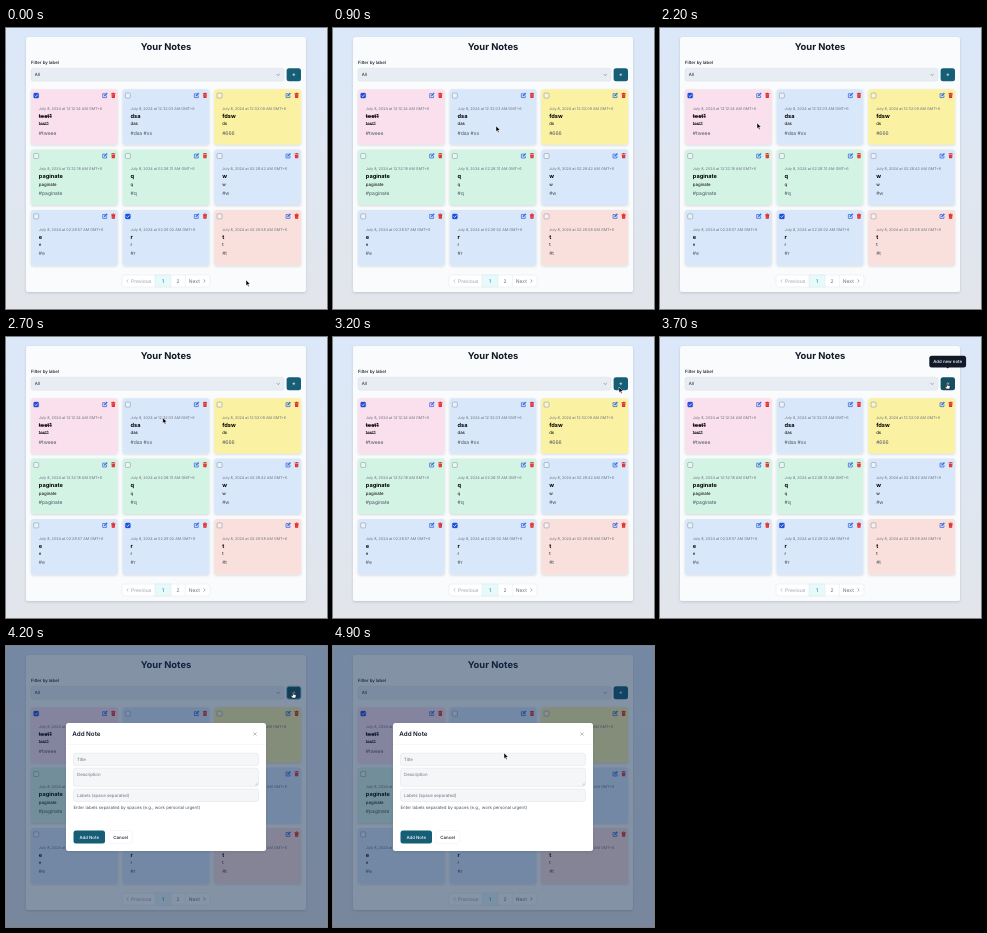
Recreate the animation shown at these times as an HTML page. Size 321 px wide and 281 px high, loop 5000 ms.

```html
<!DOCTYPE html>
<html lang="en">
<head>
<meta charset="utf-8">
<title>Your Notes</title>
<style>
html, body { margin: 0; width: 100%; height: 100%; overflow: hidden; }
svg { display: block; width: 100vw; height: 100vh; }
text { font-family: Inter, "Liberation Sans", sans-serif; text-rendering: geometricPrecision; white-space: pre; }
</style>
</head>
<body>
<svg id="stage" viewBox="0 0 321 281" preserveAspectRatio="none">
  <defs>
    <linearGradient id="sky" x2="0" y2="1">
      <stop offset="0" stop-color="#dbe8f9"/>
      <stop offset="1" stop-color="#e2e5ea"/>
    </linearGradient>
    <filter id="soft" x="-10%" y="-10%" width="120%" height="125%">
      <feDropShadow dx="0" dy="1" stdDeviation="1.2" flood-color="#334155" flood-opacity=".2"/>
    </filter>
    <g id="edit" fill="none" stroke="#3467df" stroke-width=".75" stroke-linejoin="round">
      <path d="M.2-1.6H-2.2V2.3H1.7V.2"/>
      <path d="M-.8.9-.6-.3 1.7-2.5 2.5-1.7.3.6Z" fill="#3467df" stroke-width=".3"/>
    </g>
    <g id="trash" fill="#e02424">
      <path d="M-2.1-2.1H-.9L-.6-2.6H.6L.9-2.1H2.1V-1.4H-2.1Z"/>
      <path d="M-1.8-1H1.8L1.5 2.6H-1.5Z"/>
      <path d="M-.6-.4V2M.6-.4V2" stroke="#f5a3a3" stroke-width=".3"/>
    </g>
  </defs>
  <g id="page"></g>
  <g id="tip"></g>
  <g id="modal"></g>
  <g id="pointer">
    <path id="arrow" d="M0 0V5.6L1.3 4.4 2.2 6.4 3.1 6 2.3 4.1H4.1Z" fill="#000" stroke="#fff" stroke-width=".45"/>
    <path id="hand" d="M-.5.4Q0-.4.5.4V2.3L2.6 2.8Q3.2 3 3.1 3.7L2.6 6H-.6L-2.2 3.8Q-1.8 3-.9 3.8L-.5 4Z" fill="#fff" stroke="#000" stroke-width=".5"/>
  </g>
</svg>
<script>
const $ = id => document.getElementById(id);
const INK = "#111827", GREY = "#6b7280", TEAL = "#155e75";

const rect = (x, y, w, h, fill, r = 2.5, extra = "") =>
  `<rect x="${x}" y="${y}" width="${w}" height="${h}" rx="${r}" fill="${fill}" ${extra}/>`;
const label = (x, y, str, size, fill = INK, weight = 400, extra = "") =>
  `<text x="${x}" y="${y}" font-size="${size}" fill="${fill}" font-weight="${weight}" ${extra}>${str}</text>`;
const line = (d, color, width = .6, extra = "") =>
  `<path d="${d}" fill="none" stroke="${color}" stroke-width="${width}" ${extra}/>`;
const use = (id, x, y) => `<use href="#${id}" x="${x}" y="${y}"/>`;
const edge = color => `stroke="${color}" stroke-width=".35"`;
const MID = 'text-anchor="middle"';

const BLUE = "#d8e8fa", GREEN = "#d3f3e5";
// title, text, tags, time, colour, done
const notes = [
  ["test1", "test1", "#tweee", "12:12:24", "#fadfed", true],
  ["dsa", "das", "#dsa #xx", "12:32:03", BLUE],
  ["fdsw", "ds", "#666", "12:32:09", "#faf1a3"],
  ["paginate", "paginate", "#paginate", "12:32:18", GREEN],
  ["q", "q", "#q", "02:28:31", GREEN],
  ["w", "w", "#w", "02:28:42", BLUE],
  ["e", "e", "#e", "02:28:57", BLUE],
  ["r", "r", "#r", "02:29:02", BLUE, true],
  ["t", "t", "#t", "02:29:08", "#fae0dd"]
];

function note([title, body, tags, time, color, done], i) {
  const x = 25 + (i % 3) * 91.67, y = 61.2 + Math.floor(i / 3) * 60.4;
  const tx = x + 7.8;
  const strike = i === 0 ? 'text-decoration="line-through"' : "";
  return rect(x, y, 86.67, 55.4, color, 2.5, 'filter="url(#soft)"')
    + rect(x + 2.7, y + 3.9, 5, 5, done ? "#1d4fd8" : "#f6f9fd", 1, `stroke="${done ? "#1d4fd8" : GREY}" stroke-width=".4" fill-opacity="${done ? 1 : .6}"`)
    + (done ? line(`M${x + 3.9} ${y + 6.5}l1 1 1.8-2.1`, "#fff", .75) : "")
    + use("edit", x + 73.9, y + 6.1) + use("trash", x + 82.3, y + 6.1)
    + label(tx, y + 20.7, `July 8, 2024 at ${time} AM GMT+6`, 3.75, GREY)
    + label(tx, y + 28.8, title, 5.625, "#000", 700, strike)
    + label(tx, y + 36, body, 4.375, "#000", i ? 400 : 500, strike)
    + label(tx, y + 45.3, tags, 5, "#4b5563");
}

function pager() {
  const border = edge("#d9dde3");
  return rect(116, 247, 88, 12, "#fff", 2.5, border)
    + rect(149, 247, 16, 12, "#e6fafc", 0, border)
    + line("M179.3 247V259", "#d9dde3", .35)
    + line("M122.3 251.4l-1.6 1.6 1.6 1.6", "#9ca3af")
    + label(125, 254.8, "Previous", 5, "#9ca3af")
    + label(157, 254.8, "1", 5, "#0e7490", 400, MID)
    + label(172, 254.8, "2", 5, GREY, 400, MID)
    + label(182.8, 254.8, "Next", 5, GREY)
    + line("M197.6 251.4l1.6 1.6-1.6 1.6", GREY);
}

$("page").innerHTML = rect(0, 0, 321, 281, "url(#sky)", 0)
  + rect(20, 9, 280, 255, "#fafbfc", 2.5, 'filter="url(#soft)"')
  + label(160, 21.9, "Your Notes", 9.375, INK, 700, MID)
  + label(25, 36.4, "Filter by label", 4.375, INK, 500)
  + rect(25, 40.2, 253, 13, "#e8edf3", 2.5, edge("#d1d5db"))
  + label(28.8, 48.4, "All", 4.375)
  + line("M270.6 46l1.6 1.6 1.6-1.6", GREY)
  + rect(280.6, 40.2, 14.4, 13, TEAL, 2.5, 'id="add"')
  + line("M286.4 46.7H289.2M287.8 45.3V48.1", "#fff", .6)
  + notes.map(note).join("") + pager();

$("tip").innerHTML = rect(269.3, 18.8, 36.8, 11.6, INK)
  + `<path d="M286.2 30h3l-1.5 1.6z" fill="${INK}"/>`
  + label(287.7, 26.2, "Add new note", 4.375, "#fff", 500, MID);

const field = (y, h, hint) => rect(67.5, y, 185, h, "#f5f6f8", 2.5, edge("#d1d5db"))
  + label(71, y + 8, hint, 4.375, GREY);

$("modal").innerHTML = rect(0, 0, 321, 281, "#102a50", 0, 'fill-opacity=".5"')
  + rect(60, 77, 200, 128, "#fff", 2.5, 'filter="url(#soft)"')
  + label(66.3, 90.1, "Add Note", 6.25, INK, 600)
  + line("M247.4 86.4l3.2 3.2M250.6 86.4l-3.2 3.2", "#8b93a0")
  + line("M60 98.4H260", "#e5e7eb", .35)
  + field(107.2, 12.4, "Title") + field(122.2, 18.2, "Description")
  + line("M249.2 139.4l2.4-2.4M250.6 139.4l1-1", GREY, .3)
  + field(142.9, 12.6, "Labels (space separated)")
  + label(67.5, 162.7, "Enter labels separated by spaces (e.g., work personal urgent)", 4.375, "#4b5563")
  + rect(67.5, 184.5, 31.5, 13, TEAL)
  + label(83.2, 192.6, "Add Note", 4.375, "#fff", 500, MID)
  + rect(102.8, 184.5, 23.6, 13, "#fff", 2.5, edge("#e5e7eb"))
  + label(114.6, 192.6, "Cancel", 4.375, INK, 500, MID);

// time, x, y
const path = [
  [0, 240, 252], [300, 240, 252], [900, 163, 98], [1300, 163, 98],
  [2000, 97, 95], [2400, 97, 95], [3200, 286, 50], [3400, 287, 46],
  [4200, 287, 46], [4800, 171, 107], [5000, 171, 107]
];

function place(t) {
  const i = path.findIndex(p => p[0] > t);
  const [t0, x0, y0] = path[i - 1], [t1, x1, y1] = path[i];
  const u = (t - t0) / (t1 - t0), k = u * u * (3 - 2 * u);
  return [x0 + (x1 - x0) * k, y0 + (y1 - y0) * k];
}

const show = (id, on) => $(id).setAttribute("display", on ? "inline" : "none");

function draw(ms) {
  const t = Math.floor(ms % 5000 / 100) * 100;
  const [x, y] = place(t);
  const over = t >= 3300 && t <= 4200, pressed = t >= 4100 && t <= 4200;
  $("pointer").setAttribute("transform", `translate(${x} ${y})`);
  show("arrow", !over);
  show("hand", over);
  show("tip", t >= 3300 && t < 4200);
  show("modal", t >= 4200);
  $("add").setAttribute("fill", over ? "#164e63" : TEAL);
  $("add").setAttribute("stroke", pressed ? "#8bd3e6" : "none");
}

const start = performance.now();
function tick() {
  draw(performance.now() - start);
  requestAnimationFrame(tick);
}
tick();
</script>
</body>
</html>
```
